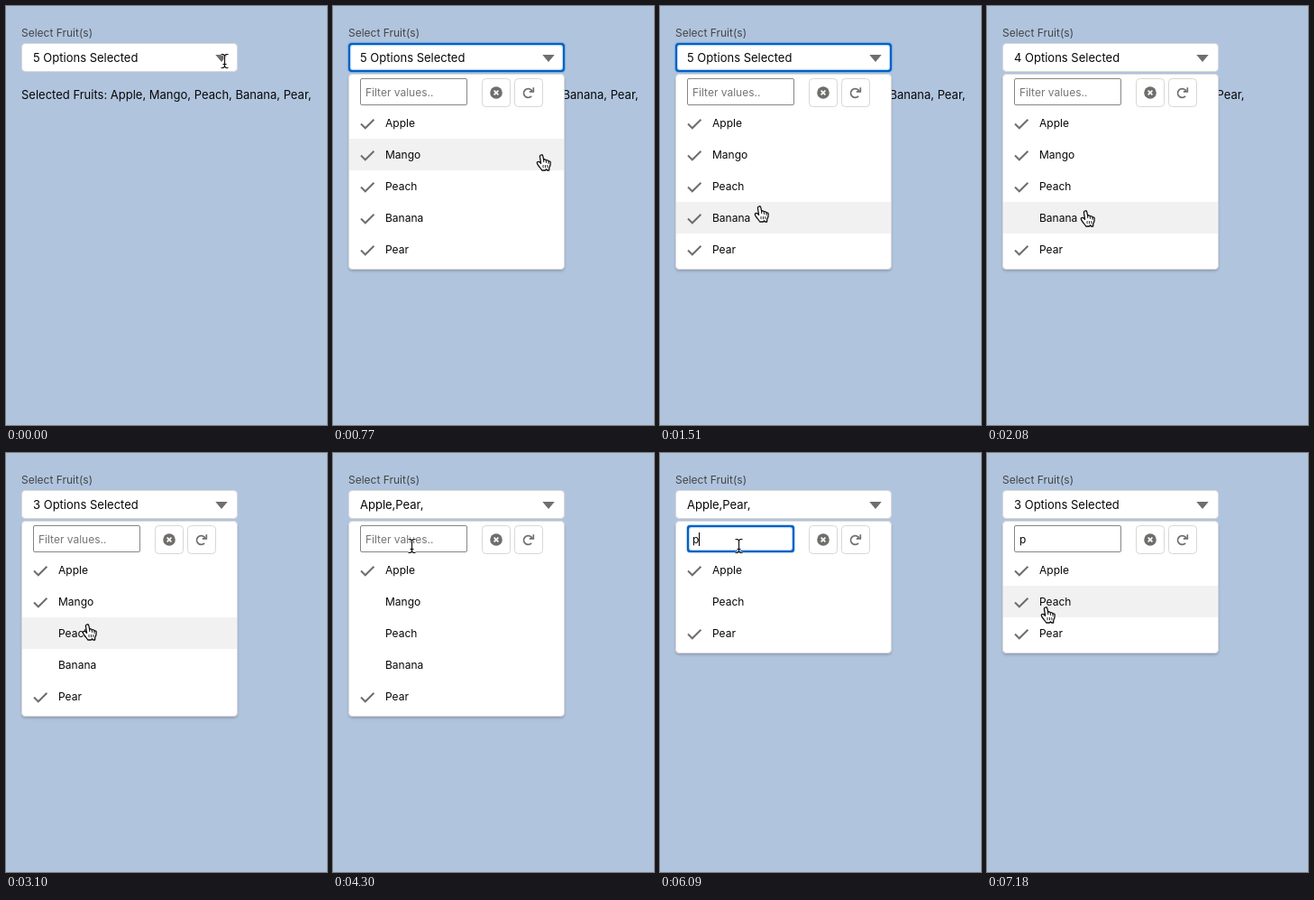
Recreate the animation shown at these times as an HTML page with a canvas. Size 356x464 px, loop 8000 ms.

```html
<!DOCTYPE html>
<html lang="en">
<head>
<meta charset="utf-8">
<title>Fruit multi-select</title>
<style>
html, body { margin: 0; width: 100%; height: 100%; overflow: hidden; background: #b0c4de; }
canvas { display: block; width: 356px; height: 464px; }
</style>
</head>
<body>
<canvas id="stage"></canvas>
<script>
const W = 356, H = 464, LOOP = 8000;
const BLUE = '#0060c6', GRAY = '#706e6b', LINE = '#d8d7d6';
const FRUITS = ['Apple', 'Mango', 'Peach', 'Banana', 'Pear'];
const ROW_TOP = 112, ROW_H = 35;

// Clicks that toggle a fruit
const TOGGLES = [[2040, 'Banana'], [2950, 'Peach'], [3480, 'Mango'], [7130, 'Peach']];
const OPEN = 370, FOCUS_FILTER = 5110, TYPED = 6090;

// Pointer hotspot: time, x, y
const PATH = [
  [0, 242, 61], [350, 242, 61], [590, 231, 165], [770, 231, 165],
  [880, 220, 162], [1240, 130, 236], [1510, 110, 222], [1560, 110, 225],
  [1590, 110, 225], [1670, 109, 227], [2500, 109, 227], [2690, 90, 194],
  [2970, 90, 194], [3100, 90, 190], [3240, 88, 163], [4010, 88, 163],
  [4290, 87, 103], [6540, 87, 103], [6690, 85, 128], [6880, 65, 171], [LOOP, 65, 171]
];

const canvas = document.getElementById('stage');
const ctx = canvas.getContext('2d');
const ratio = window.devicePixelRatio || 1;
canvas.width = W * ratio;
canvas.height = H * ratio;

const ramp = (t, from, len) => Math.min(1, Math.max(0, (t - from) / len));

function slope(i, k) {
  const a = PATH[i - 1], b = PATH[i], c = PATH[i + 1];
  if (!a || !c) return 0;
  const still = (p, q) => p[1] === q[1] && p[2] === q[2];
  return still(a, b) || still(b, c) ? 0 : (c[k] - a[k]) / (c[0] - a[0]);
}

function pointerAt(t) {
  let i = 0;
  while (i < PATH.length - 2 && t >= PATH[i + 1][0]) i++;
  const a = PATH[i], b = PATH[i + 1], d = b[0] - a[0], u = (t - a[0]) / d;
  const ease = u * u * (3 - 2 * u);
  const axis = k => a[k] + (b[k] - a[k]) * ease
    + d * u * (1 - u) * ((1 - u) * slope(i, k) - u * slope(i + 1, k));
  return { x: Math.round(axis(1)), y: Math.round(axis(2)) };
}

function text(str, x, y, size, color) {
  ctx.font = size + 'px Inter, Roboto, sans-serif';
  ctx.fillStyle = color;
  ctx.fillText(str, x, y);
}

function box(x, y, w, h, r, fill, stroke, width = 1) {
  const o = width / 2;
  ctx.beginPath();
  ctx.roundRect(x + o, y + o, w - width, h - width, r);
  if (fill) { ctx.fillStyle = fill; ctx.fill(); }
  if (stroke) { ctx.strokeStyle = stroke; ctx.lineWidth = width; ctx.stroke(); }
}

function line(points, color, width) {
  ctx.beginPath();
  points.forEach(([x, y]) => ctx.lineTo(x, y));
  ctx.strokeStyle = color;
  ctx.lineWidth = width;
  ctx.stroke();
}

function focusRing(x, y, w, h, alpha) {
  if (alpha <= 0) return;
  ctx.save();
  ctx.globalAlpha = alpha;
  ctx.shadowColor = '#0070d2';
  ctx.shadowBlur = 2 * ratio;
  box(x, y, w, h, 3, null, BLUE, 2);
  ctx.restore();
}

function drawField(t, label) {
  box(17, 41, 240, 32, 4, '#fff', LINE);
  focusRing(17, 41, 240, 32, ramp(t, 280, 90) - ramp(t, 1980, 90));
  text(label, 30, 62, 13, '#080707');
  ctx.beginPath();
  ctx.moveTo(234, 54.8);
  ctx.lineTo(244, 54.8);
  ctx.lineTo(239, 60.8);
  ctx.closePath();
  ctx.fillStyle = ctx.strokeStyle = GRAY;
  ctx.lineWidth = 1.6;
  ctx.fill();
  ctx.stroke();
}

function drawButtons() {
  box(165, 80, 32, 32, 4, '#fff', LINE);
  box(201, 80, 32, 32, 4, '#fff', LINE);
  ctx.fillStyle = GRAY;
  ctx.beginPath();
  ctx.arc(181, 96, 6.8, 0, Math.PI * 2);
  ctx.fill();
  line([[178.6, 93.6], [183.4, 98.4]], '#fff', 1.6);
  line([[183.4, 93.6], [178.6, 98.4]], '#fff', 1.6);
  ctx.beginPath();
  ctx.arc(216.5, 96.5, 4.9, 0.75, Math.PI * 2 - 0.5);
  ctx.strokeStyle = GRAY;
  ctx.lineWidth = 1.8;
  ctx.stroke();
  line([[222.3, 90.3], [222.3, 94.8], [217.8, 94.8]], GRAY, 1.7);
}

function drawFilter(t) {
  const typed = t >= TYPED;
  box(30, 80, 119, 30, 1.5, '#fff', '#868686');
  if (t >= FOCUS_FILTER) focusRing(30, 80, 119, 30, 1 - ramp(t, 7050, 90));
  text(typed ? 'p' : 'Filter values..', 36, 100, 12, typed ? '#080707' : '#757575');
  const since = t - (typed ? TYPED : FOCUS_FILTER);
  if (since >= 0 && since < 505) {
    ctx.fillStyle = '#000';
    ctx.fillRect(typed ? 43 : 36, 88, 1, 15);
  }
}

function drawMenu(t, chosen, pointer) {
  const rows = t >= TYPED ? FRUITS.filter(f => /p/i.test(f)) : FRUITS;
  const height = rows.length * ROW_H + 42;
  ctx.save();
  ctx.shadowColor = 'rgba(0,0,0,.22)';
  ctx.shadowBlur = 3 * ratio;
  ctx.shadowOffsetY = 2 * ratio;
  box(17, 75, 240, height, 4, '#fff');
  ctx.restore();
  box(17, 75, 240, height, 4, '#fff', LINE);
  drawFilter(t);
  drawButtons();
  rows.forEach((fruit, i) => {
    const top = ROW_TOP + i * ROW_H;
    if (pointer.y >= top && pointer.y < top + ROW_H) {
      ctx.fillStyle = '#f1f1f1';
      ctx.fillRect(18, top, 238, ROW_H);
    }
    if (chosen.includes(fruit))
      line([[31, top + 18.5], [35.8, top + 23.3], [45.4, top + 13.7]], GRAY, 2);
    text(fruit, 58, top + 22, 12, '#080707');
  });
}

function drawBeam({ x, y }) {
  const strokes = [
    [[x - 3.5, y - 7.5], [x - 1, y - 7.5], [x + .5, y - 6], [x + 2, y - 7.5], [x + 4.5, y - 7.5]],
    [[x + .5, y - 6], [x + .5, y + 6]],
    [[x - 3.5, y + 7.5], [x - 1, y + 7.5], [x + .5, y + 6], [x + 2, y + 7.5], [x + 4.5, y + 7.5]],
    [[x - 1.5, y + 3.5], [x + 2.5, y + 3.5]]
  ];
  strokes.forEach(s => line(s, 'rgba(255,255,255,.75)', 2.6));
  strokes.forEach(s => line(s, '#111', 1.2));
}

const HAND = new Path2D('M-1.6 1.6C-1.6-.8 1.6-.8 1.9 1.4L2.7 5.6C3.2 4.3 5.2 4.6 5.4 6.2' +
  'C6.2 5.2 7.8 5.7 8 7.1C9 6.4 10.2 7.2 10.2 8.6C10.3 11 9.8 12.4 8.8 14L8.6 17H6.6L5.6 15.8L4.4 17' +
  'H.8C-.2 15-2.3 13.2-3.6 11.1C-4.9 9.2-5.2 8.6-4.3 7.7C-3.2 6.8-1.6 7.8-.4 9.3Z');

function drawHand({ x, y }) {
  ctx.save();
  ctx.translate(x, y);
  ctx.lineJoin = 'round';
  ctx.fillStyle = '#fff';
  ctx.strokeStyle = '#111';
  ctx.lineWidth = 1.3;
  ctx.fill(HAND);
  ctx.stroke(HAND);
  [[2.6, 5.5], [5.3, 6.2], [7.9, 7.2]].forEach(([a, b]) => line([[a, b], [a + .2, b + 2.6]], '#111', 1));
  [2, 4.4, 6.8].forEach(a => line([[a, 11], [a + .1, 14.2]], '#111', .9));
  ctx.restore();
}

function draw(t) {
  const off = new Set();
  TOGGLES.forEach(([at, fruit]) => {
    if (t >= at && !off.delete(fruit)) off.add(fruit);
  });
  const chosen = FRUITS.filter(f => !off.has(f));
  const label = chosen.length > 2
    ? chosen.length + ' Options Selected'
    : chosen.map(f => f + ',').join('');
  const pointer = pointerAt(t);

  ctx.setTransform(ratio, 0, 0, ratio, 0, 0);
  ctx.fillStyle = '#b0c4de';
  ctx.fillRect(0, 0, W, H);
  text('Select Fruit(s)', 17, 34, 12, '#444');
  text('Selected Fruits: ' + chosen.map(f => f + ',').join(' '), 17, 103, 13, '#080707');
  drawField(t, label);
  if (t >= OPEN) drawMenu(t, chosen, pointer);
  (pointer.y < ROW_TOP ? drawBeam : drawHand)(pointer);
}

function tick() {
  draw(performance.now() % LOOP);
  requestAnimationFrame(tick);
}
tick();
</script>
</body>
</html>
```
